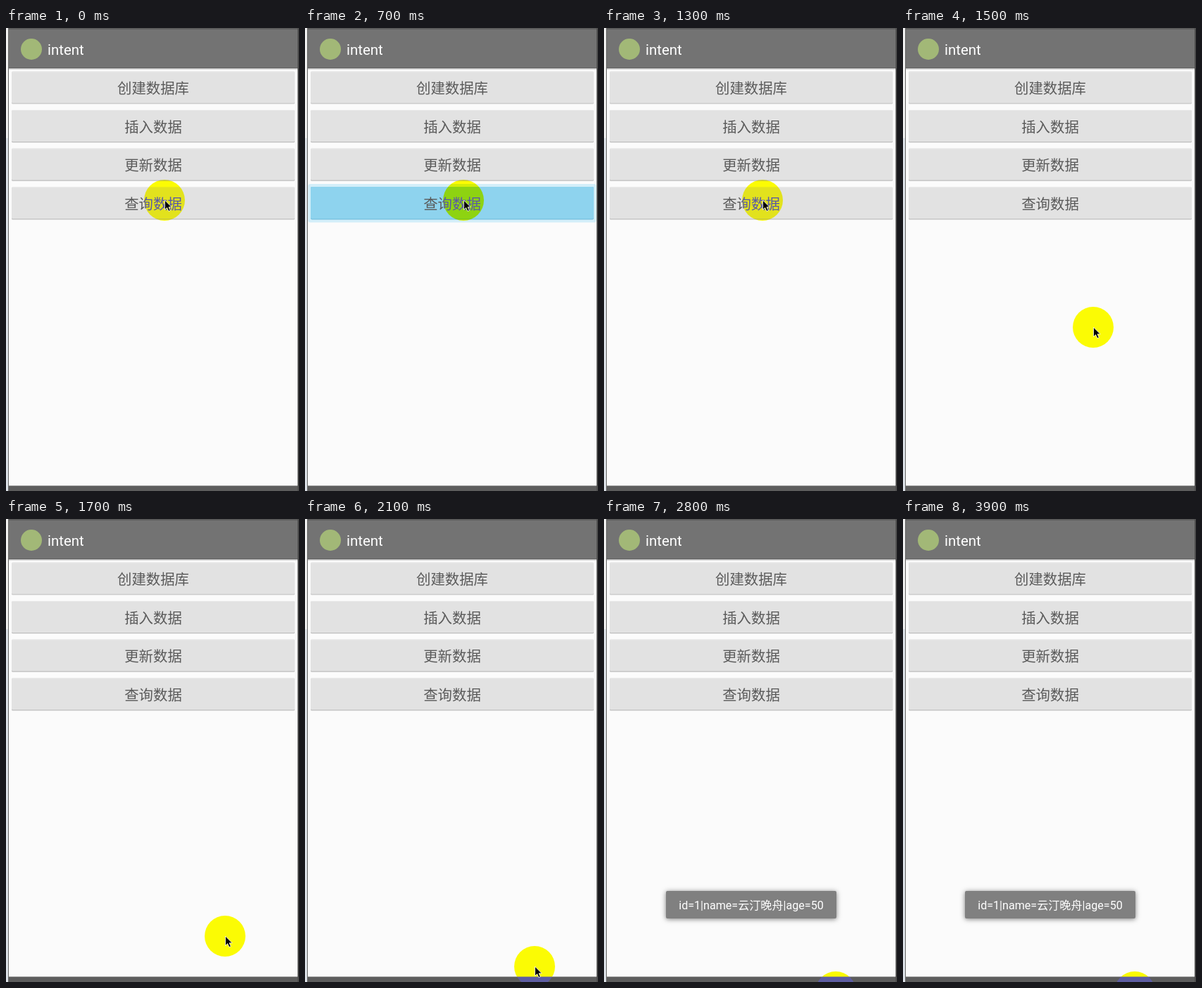
An HTML page that plays this animation: 416x656 px, repeating every 4.1 s.

```html
<!DOCTYPE html>
<html lang="zh-CN">
<head>
<meta charset="utf-8">
<title>intent</title>
<style>
  html, body { margin: 0; width: 100%; height: 100%; overflow: hidden; background: #fbfbfb; }
  svg { display: block; width: 416px; height: 656px; }
  text { font-family: Roboto, "Noto Sans CJK SC", "Noto Sans CJK", sans-serif; }
  .label { font-size: 20.4px; fill: #5a5a5a; text-anchor: middle; }
  .title { font-size: 20.4px; fill: #fff; }
  .note { font-size: 16.1px; fill: #fff; text-anchor: middle; }

  .press, .toast, .pointer { animation: 4100ms step-end infinite; }
  .press { animation-name: press; }
  .toast { animation-name: toast; }
  .panel { fill: #808080; filter: drop-shadow(0 1px 3.5px rgba(0, 0, 0, .5)); }
  .pointer { animation-name: move; }
  /* the spotlight inverts only the blue channel beneath it */
  .spot { fill: #00f; mix-blend-mode: difference; }

  @keyframes press {
    0% { opacity: 0; }
    17.07% { opacity: 1; }
    31.7%, 100% { opacity: 0; }
  }
  @keyframes toast {
    0% { opacity: 0; }
    53.65% { opacity: .08; }
    56.09% { opacity: .26; }
    58.53% { opacity: .48; }
    60.97% { opacity: .72; }
    63.41% { opacity: .92; }
    68.29%, 100% { opacity: 1; }
  }
  @keyframes move {
    0% { transform: translate(225px, 244px); }
    34.14% { transform: translate(237px, 294px); }
    36.58% { transform: translate(270px, 424px); }
    39.02% { transform: translate(301px, 549px); }
    41.46% { transform: translate(311px, 591px); }
    46.34% { transform: translate(314px, 596px); }
    48.78% { transform: translate(320px, 612px); }
    51.21% { transform: translate(326px, 634px); }
    53.65% { transform: translate(329px, 652px); }
    56.09% { transform: translate(329px, 662px); }
    58.53% { transform: translate(329px, 668px); }
    63.41%, 100% { transform: translate(329px, 670px); }
  }
</style>
</head>
<body>
<svg viewBox="0 0 416 656">
  <defs>
    <g id="button">
      <rect x="8" y="1" width="402" height="45.2" rx="1.5" fill="#bdbdbd"/>
      <rect x="8" width="402" height="45" rx="1.5" fill="#e2e2e2"/>
      <path d="M9 .5H409" stroke="#ebebeb"/>
    </g>
  </defs>

  <rect width="416" height="656" fill="#fbfbfb"/>
  <rect width="3" height="156" fill="#f1f1f1"/>
  <rect y="156" width="3" height="500" fill="#dde2e8"/>
  <rect x="3" width="411" height="57" fill="#737373"/>
  <rect x="3" width="413" height="2" fill="#5c5c5c"/>
  <rect x="3" y="56" width="411" height="1.5" fill="#616161"/>
  <rect x="3" y="57.5" width="411" height="1.5" fill="#d9d9d9"/>
  <rect x="3" y="648.5" width="411" height="8" fill="#5d5d5d"/>
  <rect x="3" width="1" height="656" fill="#666"/>
  <rect x="414" width="2" height="656" fill="#4c4c4c"/>

  <circle cx="36" cy="30" r="15" fill="#a2b877"/>
  <text class="title" x="59" y="38">intent</text>

  <use href="#button" y="61.4"/>
  <use href="#button" y="116"/>
  <use href="#button" y="170.6"/>
  <use href="#button" y="225.2"/>

  <g class="press">
    <rect x="4.5" y="221" width="409" height="54.5" rx="3" fill="#d3eef9"/>
    <rect x="8" y="225" width="402" height="46.4" rx="2" fill="#74bfdd"/>
    <rect x="8" y="225" width="402" height="45.2" rx="2" fill="#8ed3ee"/>
  </g>

  <text class="label" x="209" y="93">创建数据库</text>
  <text class="label" x="209" y="147.5">插入数据</text>
  <text class="label" x="209" y="202">更新数据</text>
  <text class="label" x="209" y="256.5">查询数据</text>

  <g class="toast">
    <rect class="panel" x="88" y="527" width="242" height="39" rx="2"/>
    <text class="note" x="209" y="553">id=1|name=云汀晚舟|age=50</text>
  </g>

  <circle class="pointer spot" r="29"/>
  <path class="pointer" d="M.5 0V13.5L3.6 10.6L5.9 15.6L8.3 14.6L6 9.8H10.2Z" fill="#000" stroke="#fff" stroke-width=".8"/>
</svg>
</body>
</html>
```
